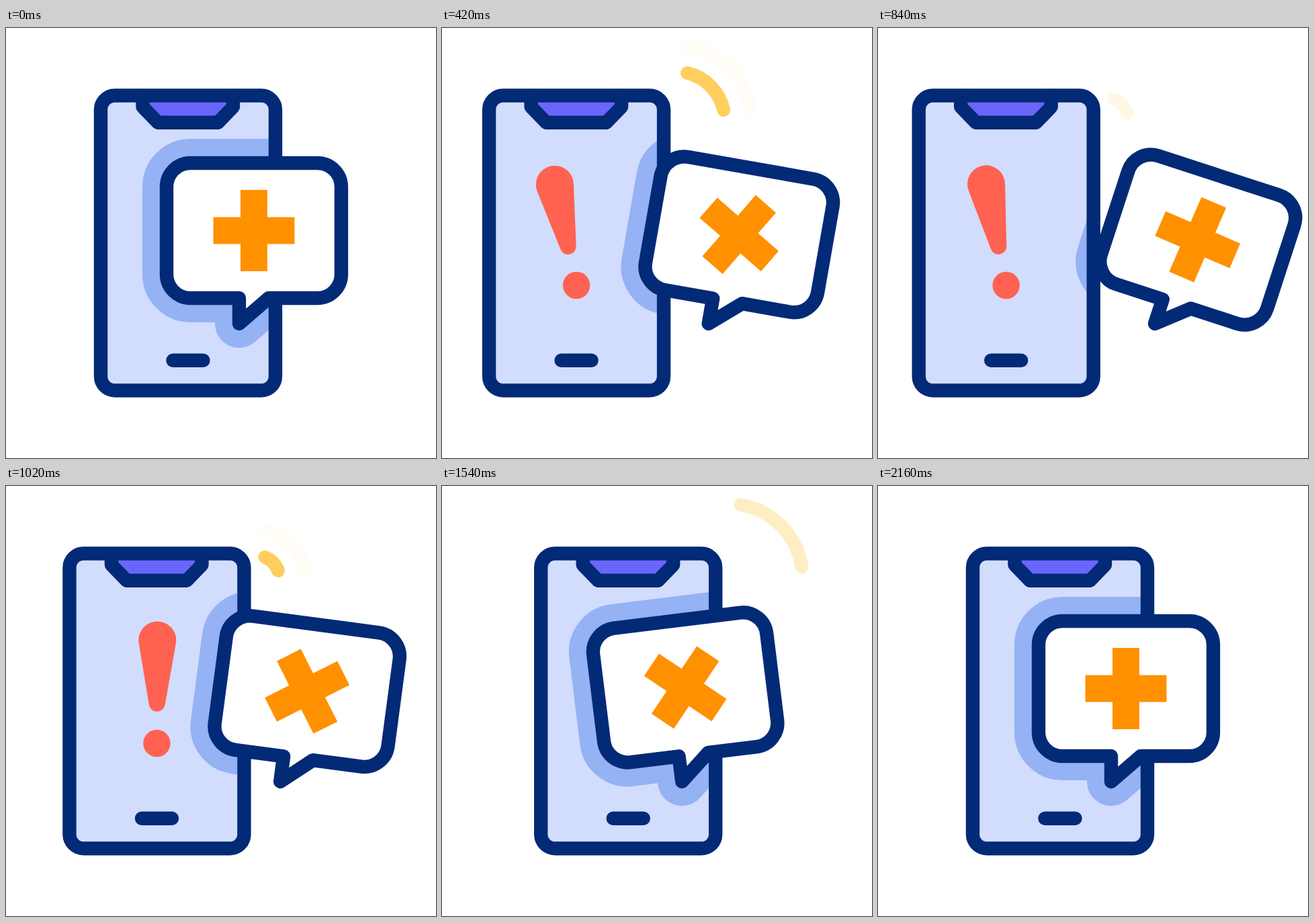
An HTML page that plays this animation: 640 px wide and 640 px high, repeating every 3.6 s.

```html
<!DOCTYPE html>
<html lang="en">
<head>
<meta charset="utf-8">
<title>Mobile health alert</title>
<style>
  html, body { margin: 0; width: 100%; height: 100%; overflow: hidden; background: #fff; }
  svg { display: block; width: 100%; height: 100%; }
  .line { fill: none; stroke: #032a76; stroke-width: 20.4; stroke-linecap: round; stroke-linejoin: round; }
  .wave { fill: none; stroke: #ffcc55; stroke-width: 20; stroke-linecap: round; opacity: 0; }
</style>
</head>
<body>
<svg viewBox="0 0 640 640">
  <defs>
    <clipPath id="screen"><rect x="141" y="100.5" width="250" height="439" rx="20"/></clipPath>
    <path id="balloon" d="M274.5 201h189a35.5 35.5 0 0 1 35.5 35.5v130a35.5 35.5 0 0 1 -35.500 35.500H391L347 440V402h-72.500a35.500 35.500 0 0 1 -35.500 -35.500v-130a35.500 35.500 0 0 1 35.500 -35.500Z"/>
  </defs>
  <g id="phone">
    <path class="wave" d="M432 106a34 34 0 0 1 19.500 20"/>
    <path class="wave" d="M436 67a72 72 0 0 1 54 55"/>
    <path class="wave" d="M438 28a110 110 0 0 1 91 92"/>
    <rect x="141" y="100.5" width="260" height="439" rx="21" fill="#d2dcfd"/>
    <g clip-path="url(#screen)">
      <use id="shadow" href="#balloon" fill="#94b2f4" stroke="#94b2f4" stroke-width="72" stroke-linejoin="round"/>
    </g>
    <g fill="#ff6250">
      <circle cx="271" cy="383" r="20.2"/>
      <path id="mark" d="M243.400 234.200a28 28 0 1 1 55.200 0L282.800 326a12 12 0 0 1 -23.600 0Z"/>
    </g>
    <path class="line" style="fill:#6b66fb" d="M203.500 101v16.500L226 140.700h89.500L338 117.500V101"/>
    <rect class="line" x="141" y="100.5" width="260" height="439" rx="21"/>
    <path class="line" d="M248.500 494.700h45"/>
  </g>
  <g id="bubble">
    <use href="#balloon" class="line" style="fill:#fff"/>
    <path id="plus" fill="#ff9100" d="M349 241h40v40.500h40.500v40h-40.500v40.500h-40v-40.500h-40.500v-40h40.500Z"/>
  </g>
</svg>
<script>
  const LOOP = 3600, REST = 2160, STEP = 20;

  const smooth = bezier(1 / 3, 0, 2 / 3, 1);
  const easeOut = bezier(0.3, 0.7, 0.67, 1);
  const sineOut = bezier(0.39, 0.575, 0.565, 1);
  const whirl = bezier(0.7, 0.22, 0.39, 0.9);

  // Each swing is [end time, end value, easing]; every part starts from 0.
  const phoneX = track([750, -86, easeOut], [1330, 2], [1700, 9], [REST, 0]);
  const bubbleX = track([800, 65, sineOut], [880, 65], [1960, -17.5], [REST, 0]);
  const bubbleTilt = track([800, 18.5], [1370, -14.5], [1760, 4], [REST, 0]);
  const markTilt = track([680, -18], [1080, 1.5], [1360, -4], [REST, 0]);
  const plusSpin = track([REST, 360, whirl]);

  function bezier(x1, y1, x2, y2) {
    const at = (a, b, s) => 3 * a * s * (1 - s) ** 2 + 3 * b * s * s * (1 - s) + s ** 3;
    return u => {
      let low = 0, high = 1;
      for (let i = 0; i < 24; i++) {
        const mid = (low + high) / 2;
        if (at(x1, x2, mid) < u) low = mid; else high = mid;
      }
      return at(y1, y2, high);
    };
  }

  function track(...swings) {
    return t => {
      let start = 0, from = 0;
      for (const [end, to, ease = smooth] of swings) {
        if (t <= end) return from + (to - from) * ease((t - start) / (end - start));
        start = end;
        from = to;
      }
      return from;
    };
  }

  const place = (id, transform) => document.getElementById(id).setAttribute("transform", transform);
  const waves = document.querySelectorAll(".wave");
  const pulse = (t, peak) => Math.max(0, 1 - Math.abs(t - peak) / 200);

  function draw(t) {
    const x = phoneX(t), shift = bubbleX(t);
    const tilt = `rotate(${bubbleTilt(t)} 347 440)`;
    place("phone", `translate(${x} 0)`);
    place("shadow", `translate(${shift - x} 0) ${tilt}`);
    place("bubble", `translate(${shift} 0) ${tilt}`);
    place("mark", `rotate(${markTilt(t)} 271 383)`);
    place("plus", `rotate(${plusSpin(t)} 369 301.5)`);
    waves.forEach((wave, i) => {
      const peak = 210 + 200 * i;
      wave.style.opacity = pulse(t, peak) + pulse(t, peak + 800);
    });
  }

  function tick() {
    const t = performance.now() % LOOP;
    draw(Math.min(Math.floor(t / STEP) * STEP, REST));
    requestAnimationFrame(tick);
  }
  tick();
</script>
</body>
</html>
```
